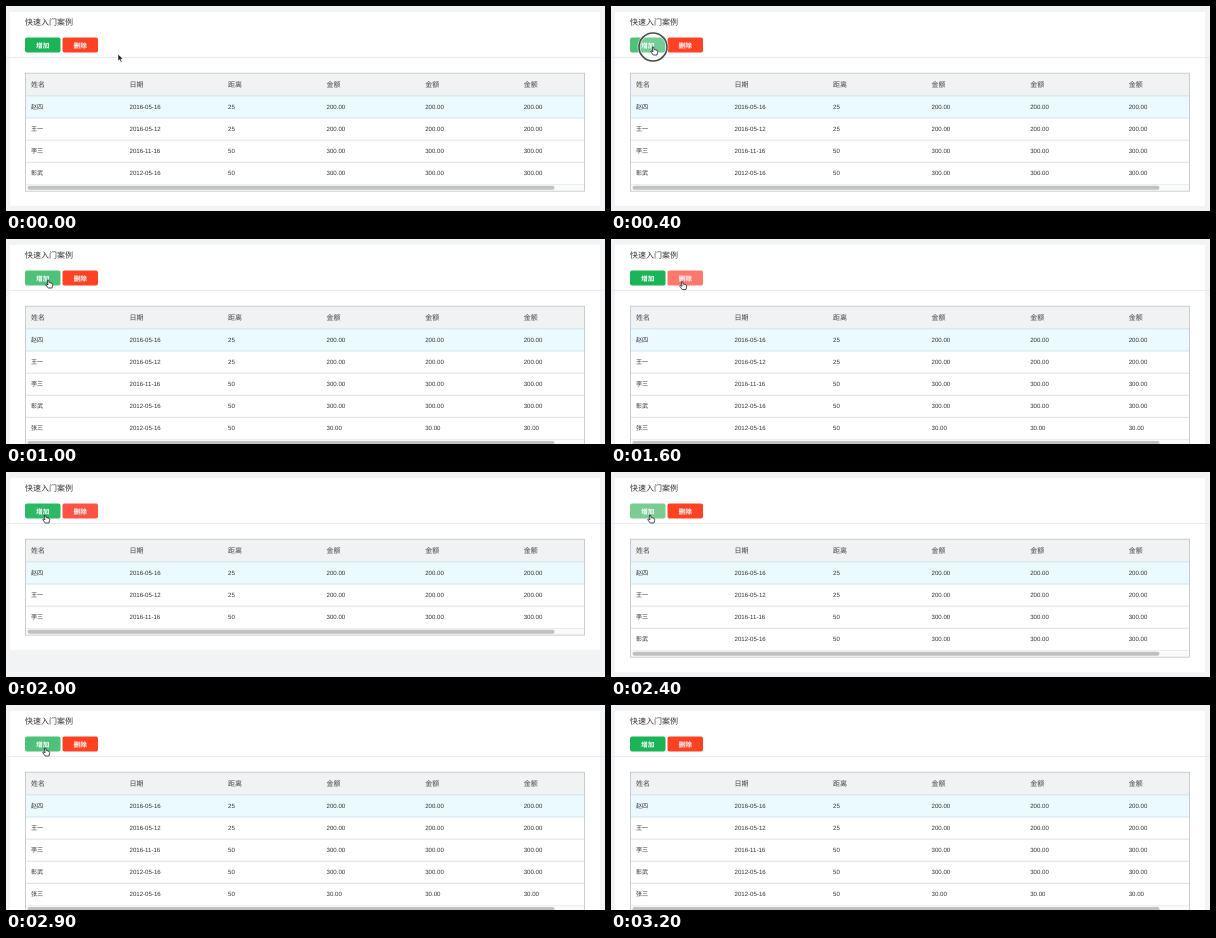
An HTML page that plays this animation: 599x205 px, repeating every 3.3 s.

```html
<!DOCTYPE html>
<html lang="zh-CN">
<head>
<meta charset="utf-8">
<style>
html, body { margin: 0; width: 100%; height: 100%; overflow: hidden; background: #f2f3f5; }
svg { display: block; width: 599px; height: 205px; }
text {
  font-family: "Liberation Sans", "Noto Sans CJK SC", "Noto Sans CJK", sans-serif;
  text-rendering: geometricPrecision; white-space: pre;
}
</style>
</head>
<body>
<svg id="stage" viewBox="0 0 599 205"></svg>
<script>
const LOOP = 3300, TICK = 100, ROW = 22.1, TOP = 67, BODY = 90;
const COLS = [25, 123.5, 222, 320.6, 419.2, 517.7];
const HEAD = ['姓名', '日期', '距离', '金额', '金额', '金额'];
const DATA = [
  ['赵四', '2016-05-16', '25', '200.00'],
  ['王一', '2016-05-12', '25', '200.00'],
  ['李三', '2016-11-16', '50', '300.00'],
  ['彰武', '2012-05-16', '50', '300.00'],
  ['张三', '2012-05-16', '50', '30.00']
];

// Step tables: [start in ms, value]
const COUNT = [[0, 4], [500, 5], [1700, 4], [1800, 3], [2400, 4], [2500, 5]];
const GREEN = [[0, '#1cb459'], [300, '#3cbc6d'], [400, '#50c17b'], [1300, '#36ba69'],
  [1400, '#1cb459'], [2000, '#2bb965'], [2100, '#50c17b'], [2400, '#79cd92'],
  [2600, '#50c17b'], [3000, '#2bb965'], [3100, '#1cb459']];
const RED = [[0, '#ff4223'], [1400, '#ff5a48'], [1500, '#ff786c'], [1900, '#ff665a'],
  [2000, '#ff5346'], [2100, '#ff4223']];
const CURSOR = [[0, ['arrow', 112, 48]], [100, ['arrow', 102, 48]], [200, ['arrow', 70, 48]],
  [300, ['hand', 46, 43]], [400, ['hand', 43, 45]], [1300, ['hand', 48, 45]],
  [1400, ['hand', 63, 46]], [1500, ['hand', 72, 46.5]], [1900, ['hand', 59, 47]],
  [2000, ['hand', 40, 47]], [3000, ['arrow', 58, 90]], [3100, ['arrow', 82, 170]],
  [3200, ['none', 0, 0]]];
const RING = [[0, 0], [400, 1], [500, 0]];

const stage = document.getElementById('stage');
function el(tag, attrs, parent = stage, content = '') {
  const node = document.createElementNS('http://www.w3.org/2000/svg', tag);
  set(node, attrs);
  node.textContent = content;
  return parent.appendChild(node);
}
function set(node, attrs) {
  for (const key in attrs) node.setAttribute(key, attrs[key]);
}
const rect = (x, y, width, height, fill, parent, more) =>
  el('rect', { x, y, width, height, fill, ...more }, parent);
const label = (x, y, size, fill, content, parent, more) =>
  el('text', { x, y, 'font-size': size, fill, ...more }, parent, content);
const at = (steps, t) => steps.filter(step => step[0] <= t).pop()[1];

rect(0, 0, 599, 205, '#f2f3f5');
const panel = rect(4, 6, 590, 194, '#fff');
rect(0, 51, 599, 1, '#e9eaec');
label(19, 19.4, 8, '#333', '快速入门案例');

function button(x, content) {
  const face = rect(x, 31.5, 35.5, 15, '#000', stage, { rx: 2 });
  label(x + 17.7, 41.5, 6.7, '#fff', content, stage,
    { 'text-anchor': 'middle', 'font-weight': 700 });
  return face;
}
const add = button(19, '增加');
const remove = button(56.5, '删除');

rect(19, TOP, 560, 23, '#f1f2f4');
HEAD.forEach((name, i) => label(COLS[i], 81, 7, '#444', name));

const rows = DATA.map((cells, i) => {
  const y = BODY + ROW * i, g = el('g', {});
  if (!i) rect(19, y, 560, ROW, '#eafaff', g);
  rect(19, y - 0.5, 560, 0.8, i < 2 ? '#c9dfe6' : '#d3d9dd', g);
  [...cells, cells[3], cells[3]].forEach((cell, j) =>
    label(COLS[j], y + 12.5, 6.1, '#333', cell, g));
  return g;
});

const bar = el('g', {});
rect(19.5, 0, 559, 6.5, '#fafafa', bar);
rect(19.5, -0.3, 559, 0.7, '#e3e5e7', bar);
rect(21.5, 1.4, 527, 4, '#c1c1c1', bar, { rx: 2 });
const frame = rect(19.5, TOP + 0.2, 559, 118, 'none', stage,
  { stroke: '#c3c9ce', 'stroke-width': 0.9 });

const ring = el('g', {});
el('circle', { cx: 42, cy: 41, r: 14, fill: '#fff', 'fill-opacity': 0.2,
  stroke: '#fff', 'stroke-width': 3, 'stroke-opacity': 0.7 }, ring);
el('circle', { cx: 42, cy: 41, r: 14, fill: 'none', stroke: '#484c4a', 'stroke-width': 1.6 }, ring);

const shapes = {
  arrow: el('path', { d: 'M0 0V7L1.6 5.5 2.8 8.3 4 7.8 2.8 5.1H5Z',
    fill: '#222', stroke: '#fff', 'stroke-width': 0.5 }),
  hand: el('path', { d: 'M-1.6-4Q-1-4.8-.4-4L.2-1.4 1.6-1.1 3.2-.6Q4 0 3.6 1.5L3 4H-.8L-3.2.8Q-3.2-.3-2.2.1L-1 .8Z',
    fill: '#fff', stroke: '#222', 'stroke-width': 0.8, 'stroke-linejoin': 'round' })
};

function draw(time) {
  const t = Math.floor(time % LOOP / TICK) * TICK;
  const n = at(COUNT, t), end = BODY + ROW * n;
  rows.forEach((row, i) => set(row, { display: i < n ? 'inline' : 'none' }));
  set(bar, { transform: `translate(0 ${end})` });
  set(frame, { height: end + 6.6 - TOP });
  set(panel, { height: end + 15.6 });
  set(add, { fill: at(GREEN, t) });
  set(remove, { fill: at(RED, t) });
  set(ring, { display: at(RING, t) ? 'inline' : 'none' });
  const [kind, x, y] = at(CURSOR, t);
  for (const name in shapes) {
    set(shapes[name], { display: name === kind ? 'inline' : 'none', transform: `translate(${x} ${y})` });
  }
}

const start = performance.now();
function loop() {
  draw(performance.now() - start);
  requestAnimationFrame(loop);
}
loop();
</script>
</body>
</html>
```
